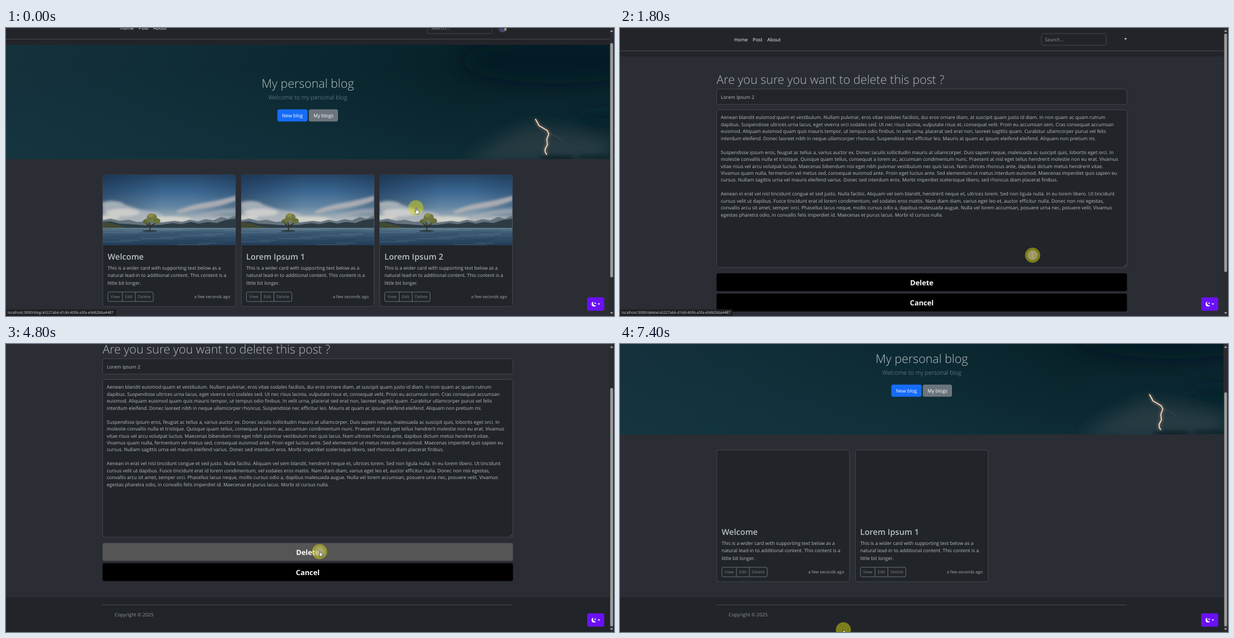
Animation of 1086 by 516 pixels, one loop 7600 ms. Source, as an HTML page:

```html
<!DOCTYPE html>
<html lang="en">
<head>
<meta charset="utf-8">
<title>Personal blog</title>
<style>
html, body { margin: 0; width: 100%; height: 100%; overflow: hidden; background: #2b2d34; }
svg { display: block; width: 1086px; height: 516px; font-family: "Open Sans", "Noto Sans", sans-serif; text-rendering: geometricPrecision; }
</style>
</head>
<body>
<svg id="stage" viewBox="0 0 1086 516"></svg>
<script>
const LOOP = 7600, TICK = 200;
const BODY = 8.55, SMALL = 7.55;
const DARK = '#212429', LINE = '#43474c', GREY = '#6c757d', SOFT = '#b9bfc5';

const rect = (x, y, w, h, fill, more = '') =>
  `<rect x="${x}" y="${y}" width="${w}" height="${h}" fill="${fill}" ${more}/>`;
const box = (x, y, w, h, fill = DARK, line = LINE) =>
  rect(x + .5, y + .5, w - 1, h - 1, fill, `rx="3.5" stroke="${line}"`);
const path = (d, fill, more = '') => `<path d="${d}" fill="${fill}" ${more}/>`;
const oval = (x, y, rx, ry, fill, more = '') =>
  `<ellipse cx="${x}" cy="${y}" rx="${rx}" ry="${ry}" fill="${fill}" ${more}/>`;
// y is the middle of the capitals
const text = (x, y, str, size = BODY, fill = SOFT, more = '') =>
  `<text x="${x}" y="${(y + size * .357).toFixed(2)}" font-size="${size}" fill="${fill}" ${more}>${str}</text>`;
const MID = 'text-anchor="middle"', END = 'text-anchor="end"';
const LIGHT = 'font-weight="300"', BOLD = 'font-weight="700"';
const grad = (id, dir, stops) => `<linearGradient id="${id}" ${dir}>` +
  stops.map(([at, c]) => `<stop offset="${at}" stop-color="${c}"/>`).join('') + '</linearGradient>';
const blur = (id, size) => `<filter id="${id}" x="-60%" y="-60%" width="220%" height="220%"><feGaussianBlur stdDeviation="${size}"/></filter>`;
const DOWN = 'x1="0" y1="0" x2="0" y2="1"';
const caret = (x, y) => path(`M${x - 2.4} ${y - 1.2}h4.8l-2.4 2.5z`, '#fff');

// thin wave streaks spread over the lake
const ripples = [...Array(22)].map((_, i) =>
  rect((i * 89) % 215 - 15, 97 + i * 1.35, 30 + (i * 37) % 50, .9, i % 2 ? '#9bb0bf' : '#162d44', 'opacity=".3"')).join('');

const photo = `<g id="photo" clip-path="url(#round)">
  ${rect(0, 0, 238, 97, 'url(#sky)')}
  ${rect(0, 0, 238, 97, 'url(#side)')}
  <g filter="url(#soft)">
    ${path('M0 52Q14 44 30 50T58 60 88 66 110 76 150 79 238 76V92H0Z', '#b3bac0', 'opacity=".8"')}
    ${oval(16, 53, 22, 6, '#a9b2ba', 'opacity=".6"')}
    ${oval(36, 68, 30, 7, '#d6d6d2', 'opacity=".8"')}
    ${oval(10, 77, 22, 4, '#e2dfd6', 'opacity=".7"')}
    ${oval(120, 80, 40, 5, '#dedbd0', 'opacity=".8"')}
    ${path('M130 67Q150 56 180 51T238 38V47Q208 58 182 61T138 70Z', '#b9b6b8', 'opacity=".85"')}
    ${path('M165 74Q200 63 238 60V70Q200 70 175 79Z', '#aab0b7', 'opacity=".6"')}
  </g>
  ${path('M0 82L14 79 30 83 46 81 62 85 85 83 105 86 128 83 142 85 156 81 170 84 184 80 198 82 212 76 224 79 238 73V96H0Z', '#65747f')}
  ${path('M0 85L14 84 30 88 50 89 76 91 105 90 125 87 140 89 158 85 172 88 188 85 204 87 218 82 238 79V97H0Z', '#2d3b45')}
  ${path('M0 85Q16 87 28 91T58 97H0Z', '#424a30')}
  ${rect(0, 95.5, 238, 32, 'url(#lake)')}
  ${ripples}
  ${path('M84 100Q87 92 83 86M85 93Q91 89 97 86M84 92Q79 90 77 86', 'none', 'stroke="#2f301f" stroke-width="1.8"')}
  ${oval(88, 76, 9, 6, '#74793f')}${oval(78, 84, 6, 4, '#5c6636')}${oval(96, 83, 7, 5, '#69713a')}
  ${oval(86, 73, 5, 3.5, '#8b8b4c')}${oval(83, 81, 6, 4, '#6f7540')}
  ${oval(84, 101, 13, 1.8, '#27332f', 'opacity=".8"')}
</g>`;

const defs = `<defs>
  ${grad('sky', DOWN, [[0, '#254566'], [.3, '#39658f'], [.6, '#6487a4'], [.88, '#b9bfbd']])}
  ${grad('side', 'x1="0" y1="0" x2="1" y2="0"', [[0, '#10203866'], [.45, '#10203800'], [.7, '#10203800'], [1, '#10203833']])}
  ${grad('lake', DOWN, [[0, '#627c8d'], [.25, '#3d5c77'], [1, '#213c57']])}
  ${grad('storm', 'x1="0" y1="0" x2="1" y2=".12"', [[0, '#15313c'], [.25, '#102e38'], [.55, '#0b2831'], [.8, '#072027'], [1, '#08212a']])}
  ${grad('haze', DOWN, [[.2, '#163b4700'], [1, '#163b4777']])}
  ${blur('soft', 2.2)}${blur('glow', 2.5)}${blur('mist', 14)}
  <clipPath id="round"><path d="M0 127V3.5Q0 0 3.5 0H234Q237.500 0 237.500 3.500V127Z"/></clipPath>
  <clipPath id="heroBox"><rect y="51" width="1078" height="205"/></clipPath>
  ${photo}
</defs>`;

const nav = rect(0, 0, 1078, 51, '#222429') + rect(0, 40.5, 1078, 1, '#4a4e53') +
  [[204, 'Home'], [237, 'Post'], [263, 'About']].map(([x, s]) => text(x, 20.5, s, BODY, '#f4f5f6')).join('') +
  box(752, 9.5, 117, 22) + text(759, 20.5, 'Search...', BODY, '#8f959b') +
  `<g class="avatar">${oval(887, 20, 9, 9, '#34343c')}${oval(884, 16, 4, 4, '#a3917c')}${oval(890, 16, 3.5, 3.5, '#6f6259')}
   ${path('M881 26Q882 20 887 22T893 26Q887 31 881 26Z', '#454b6b')}${oval(892, 23, 2, 3, '#a3917c')}</g>` + caret(903, 19.7);

const bolt = 'M945.500 184L949 190 952 196 959 200 967 205 969.500 211 966 220 967 230 963 238 963 243 966 248';
const hero = `<g clip-path="url(#heroBox)">
  ${rect(0, 51, 1078, 205, 'url(#storm)')}${rect(0, 51, 1078, 205, 'url(#haze)')}
  <g filter="url(#mist)">
    ${oval(985, 80, 170, 40, '#041b22', 'opacity=".5"')}
    ${path('M820 262L880 222 935 196 1000 205 1078 222V262Z', '#3a474e', 'opacity=".6"')}
    ${oval(1065, 190, 50, 18, '#071e27', 'opacity=".6"')}
  </g>
  <g filter="url(#soft)">${oval(985, 254, 32, 5, '#0e1e26', 'opacity=".8"')}${oval(1060, 253, 40, 6, '#11252d', 'opacity=".8"')}</g>
  ${path(bolt, 'none', 'stroke="#d8a079" stroke-width="4" opacity=".5" filter="url(#glow)"')}
  ${path('M969 208L977 213 985 216 994 225', 'none', 'stroke="#826e64" stroke-width=".8" opacity=".5"')}
  ${path(bolt, 'none', 'stroke="#f3dcc6" stroke-width="1.8" stroke-linejoin="round"')}
</g>` +
  text(539, 120, 'My personal blog', 21.4, '#bcc4c8', LIGHT + ' ' + MID) +
  text(539, 145.5, 'Welcome to my personal blog', 10.6, '#86949a', LIGHT + ' ' + MID) +
  rect(484.7, 166.7, 54, 21.8, '#166cf8', 'rx="3.5"') + text(511.7, 178, 'New blog', BODY, '#fff', MID) +
  rect(540.8, 166.7, 52.2, 21.8, GREY, 'rx="3.5"') + text(567, 178, 'My blogs', BODY, '#fff', MID);

const blurb = ['This is a wider card with supporting text below as a',
  'natural lead-in to additional content. This content is a', 'little bit longer.'];
const card = (x, title, cls = '') => `<g class="${cls}" transform="translate(${x} 283.500)">
  ${box(0, 0, 238, 237)}
  <use href="#photo" class="pic"/>
  ${text(9, 147, title, 14.6, SOFT, 'font-weight="600"')}
  ${blurb.map((s, i) => text(9, 167.3 + i * 13.6, s)).join('')}
  ${rect(58.5, 210.5, 32, 17, 'none', 'class="hot"')}
  ${rect(9.5, 210.5, 81, 17, 'none', `rx="2.5" stroke="${GREY}"`)}
  ${path('M35.500 210.500v17M58.500 210.500v17', 'none', `stroke="${GREY}"`)}
  ${text(22.5, 219, 'View', SMALL, '#777f86', MID)}
  ${text(47, 219, 'Edit', SMALL, '#777f86', MID)}
  ${text(74.5, 219, 'Delete', SMALL, '#777f86', MID + ' class="hotText"')}
  ${text(228, 219, 'a few seconds ago', SMALL, '#a5abb0', END)}
</g>`;

const footer = y => rect(0, y, 1078, 70, DARK) + rect(172, y + 13, 733, 1, '#474b50') +
  text(194, y + 31.3, 'Copyright © 2025', BODY, '#92989d');

const home = hero + card(172.5, 'Welcome') + card(420, 'Lorem Ipsum 1') +
  card(667, 'Lorem Ipsum 2', 'last') + footer(548);

const lorem = `Aenean blandit euismod quam et vestibulum. Nullam pulvinar, eros vitae sodales facilisis, dui eros ornare diam, at suscipit quam justo id diam. In non quam ac quam rutrum
dapibus. Suspendisse ultrices urna lacus, eget viverra orci sodales sed. Ut nec risus lacinia, vulputate risus et, consequat velit. Proin eu accumsan sem. Cras consequat accumsan
euismod. Aliquam euismod quam quis mauris tempor, ut tempus odio finibus. In velit urna, placerat sed erat non, laoreet sagittis quam. Curabitur ullamcorper purus vel felis
interdum eleifend. Donec laoreet nibh in neque ullamcorper rhoncus. Suspendisse nec efficitur leo. Mauris at quam ac ipsum eleifend eleifend. Aliquam non pretium mi.

Suspendisse ipsum eros, feugiat ac tellus a, varius auctor ex. Donec iaculis sollicitudin mauris at ullamcorper. Duis sapien neque, malesuada ac suscipit quis, lobortis eget orci. In
molestie convallis nulla et tristique. Quisque quam tellus, consequat a lorem ac, accumsan condimentum nunc. Praesent at nisl eget tellus hendrerit molestie non eu erat. Vivamus
vitae risus vel arcu volutpat luctus. Maecenas bibendum nisi eget nibh pulvinar vestibulum nec quis lacus. Nam ultrices rhoncus ante, dapibus dictum metus hendrerit vitae.
Vivamus quam nulla, fermentum vel metus sed, consequat euismod ante. Proin eget luctus ante. Sed elementum ut metus interdum euismod. Maecenas imperdiet quis sapien eu
cursus. Nullam sagittis urna vel mauris eleifend varius. Donec sed interdum eros. Morbi imperdiet scelerisque libero, sed rhoncus diam placerat finibus.

Aenean in erat vel nisl tincidunt congue et sed justo. Nulla facilisi. Aliquam vel sem blandit, hendrerit neque et, ultrices lorem. Sed non ligula nulla. In eu lorem libero. Ut tincidunt
cursus velit ut dapibus. Fusce tincidunt erat id lorem condimentum, vel sodales eros mattis. Nam diam diam, varius eget leo et, auctor efficitur nulla. Donec non nisi egestas,
convallis arcu sit amet, semper orci. Phasellus lacus neque, mollis cursus odio a, dapibus malesuada augue. Nulla vel lorem accumsan, posuere urna nec, posuere velit. Vivamus
egestas pharetra odio, in convallis felis imperdiet id. Maecenas et purus lacus. Morbi id cursus nulla.`;

const confirmPage = text(172.5, 92.5, 'Are you sure you want to delete this post ?', 21.4, '#b4bac0', LIGHT) +
  box(172, 109, 734, 28.5) + text(180, 123.7, 'Lorem Ipsum 2') +
  box(172, 146, 734, 283.5) +
  lorem.split('\n').map((s, i) => text(180, 160.3 + i * 12.46, s)).join('') +
  path('M900 427.500l4-4M902.500 427.500l1.500-1.500', 'none', 'stroke="#777c81" stroke-width=".7"') +
  rect(172.5, 439.5, 733, 32, '#000', 'rx="3" id="del"') + text(539, 456.5, 'Delete', 12.8, '#fff', BOLD + ' ' + MID) +
  rect(172.5, 475.7, 733, 32, '#000', 'rx="3"') + text(539, 492.5, 'Cancel', 12.8, '#fff', BOLD + ' ' + MID) +
  footer(537);

const chrome = rect(1038, 482.5, 30.5, 24, '#6a11f4', 'rx="3.5"') +
  path('M1049 490.300A4.500 4.500 0 1 0 1054 497.200A4.700 4.700 0 0 1 1049 490.300Z', '#fff') +
  path('M1052.300 491l.6 1.500 1.500.6-1.500.6-.6 1.500-.6-1.500-1.500-.6 1.500-.6z', '#fff') + caret(1059, 494.7) +
  rect(1078, 0, 8, 516, '#2b2b2d') + rect(1079.3, 10, 5, 418, '#9d9d9f', 'rx="2.5" id="thumb"') +
  path('M1079 7h5.500l-2.700-4zM1079 509h5.500l-2.700 4z', '#9d9d9f') +
  `<g id="status">${rect(0, 504, 197, 12, '#1f2023', 'id="tip"')}${text(3, 509.7, '', 6.5, '#d5d7da', 'id="url"')}</g>`;

const mouse = `<g id="mouse">${oval(0, 0, 13.5, 13.5, '#d7d70f', 'opacity=".5"')}
  ${oval(0, 0, 9, 9, '#b9aea0', 'opacity=".55" id="press"')}
  ${path('M0 0V9.500L2.300 7.400 3.900 10.800 5.400 10.100 3.900 6.900H7Z', '#fff', 'stroke="#222" stroke-width=".7" id="arrow"')}
  ${path('M0 .8Q1-.4 1.800.8V4.500L5.200 5.200Q6.300 5.500 6.100 7L5.300 11.300H.3L-2.600 7.300Q-2.200 6-1 6.800L0 7.500Z', '#fff', 'stroke="#222" stroke-width=".7" id="hand"')}
  ${path('M-2-5Q0-5 0-4Q0-5 2-5M0-4V4M-2 5Q0 5 0 4Q0 5 2 5', 'none', 'stroke="#c8c4a8" stroke-width=".8" opacity=".7" id="beam"')}</g>`;

const stage = document.getElementById('stage');
stage.innerHTML = defs + rect(0, 0, 1086, 516, '#2b2d34') +
  `<g id="page">${nav}<g id="home">${home}</g><g id="confirm">${confirmPage}</g></g>` + chrome + mouse;

const $ = id => document.getElementById(id);
const all = sel => stage.querySelectorAll(sel);
const show = (el, on) => { el.style.display = on ? '' : 'none'; };
const hotBox = stage.querySelector('.last .hot'), hotText = stage.querySelector('.last .hotText');

// time, x, y
const moves = [[0, 732, 322], [200, 731, 337], [400, 726, 378], [600, 718, 414], [800, 728, 410], [1000, 735, 407],
  [1200, 737, 407], [2200, 737, 407], [2800, 680, 384], [3400, 590, 348], [3800, 579, 344], [4000, 578, 346],
  [4400, 560, 372], [5400, 560, 372], [6200, 763, 407], [6400, 752, 409], [7200, 438, 499], [7400, 399, 512], [7600, 399, 512]];
// time, offset
const scrolls = [[0, 21], [200, 48], [400, 82], [600, 94], [1600, 94], [1800, 0], [3600, 0], [3800, 13.5], [4000, 83],
  [4800, 83], [5000, 0], [6200, 0], [6400, 58], [6600, 94], [7600, 94]];

function at(rows, t, col) {
  const i = Math.max(1, rows.findIndex(r => r[0] >= t));
  const a = rows[i - 1], b = rows[i];
  return a[col] + (b[col] - a[col]) * (t - a[0]) / (b[0] - a[0]);
}

function draw(now) {
  const t = Math.floor(now % LOOP / TICK) * TICK;
  const within = (a, b) => t >= a && t < b;
  const asking = within(1800, 5000), gone = t >= 5000;
  const y = at(scrolls, t, 1), height = asking ? 599 : 610;

  $('page').setAttribute('transform', `translate(0 ${-y})`);
  show($('home'), !asking);
  show($('confirm'), asking);
  all('.last, .pic').forEach(el => show(el, !gone));
  all('.avatar').forEach(el => show(el, t !== 1800 && t !== 5000));
  $('thumb').setAttribute('y', 10 + y * 496 / height);
  $('thumb').setAttribute('height', 496 * 516 / height);

  const hot = within(600, 1800);
  hotBox.setAttribute('fill', !hot ? 'none' : t < 800 ? '#555b60' : GREY);
  hotText.setAttribute('fill', hot ? '#fff' : '#777f86');
  $('del').setAttribute('fill', t < 4200 ? '#000' : t < 4400 ? '#3a3a3a' : '#555');

  const verb = t < 600 ? 'blog' : t < 800 ? 'edit' : 'delete';
  show($('status'), t < 2000);
  $('url').textContent = `localhost:3000/${verb}/a5227ab6-d1dd-4006-a5fa-e9d62bba4487`;
  $('tip').setAttribute('width', { blog: 197, edit: 195, delete: 201 }[verb]);

  $('mouse').setAttribute('transform', `translate(${at(moves, t, 1)} ${at(moves, t, 2)})`);
  const beam = within(1800, 4200), hand = t < 1800;
  show($('beam'), beam);
  show($('hand'), hand);
  show($('arrow'), !beam && !hand);
  show($('press'), t === 1800 || t === 4800);
}

const start = performance.now();
function loop() {
  draw(performance.now() - start);
  requestAnimationFrame(loop);
}
loop();
</script>
</body>
</html>
```
